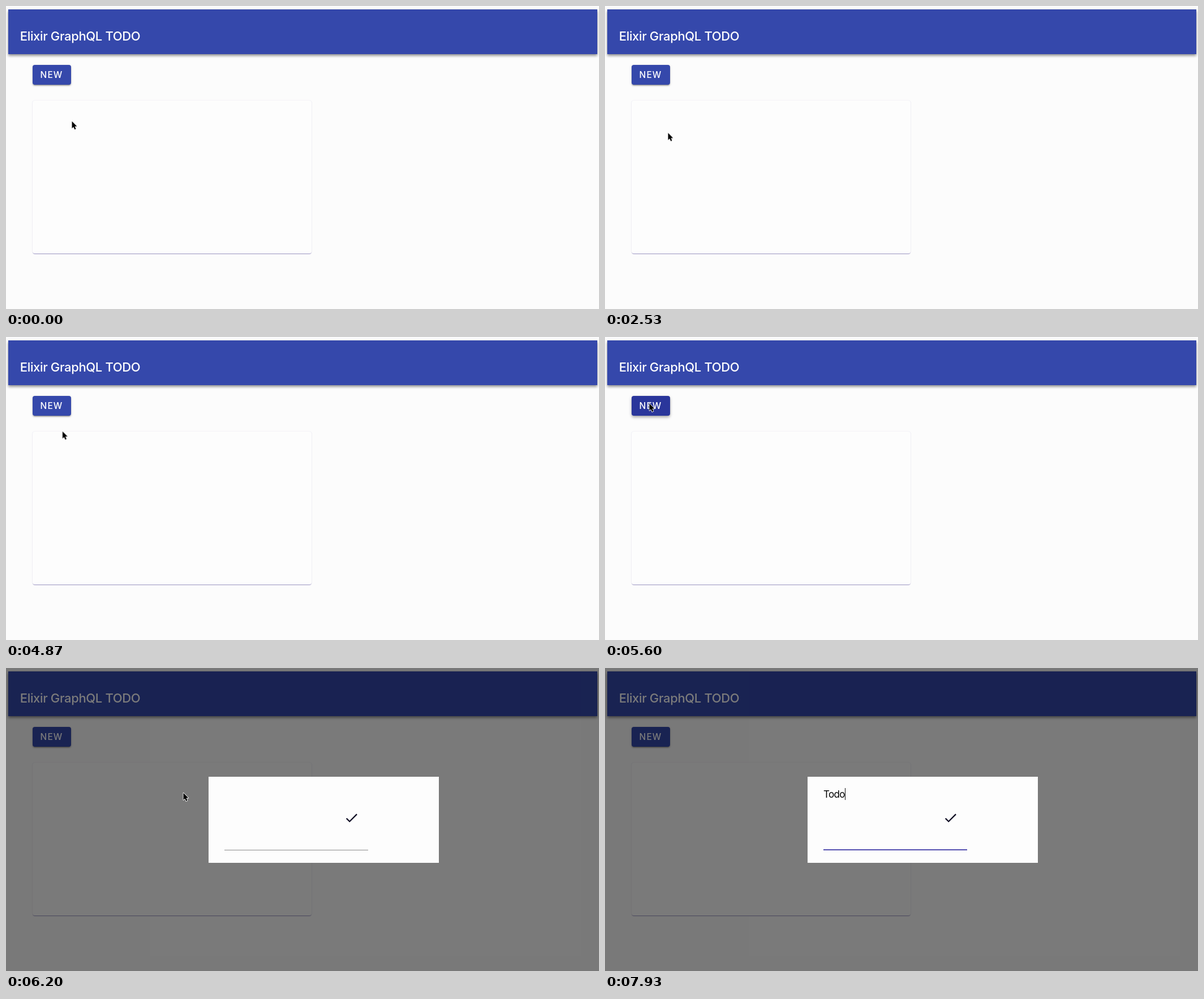
These frames come from a looping animation (1048x535 px, 8 s). An HTML page:

```html
<!DOCTYPE html>
<html lang="en">
<head>
<meta charset="utf-8">
<title>Todo app</title>
<style>
  html, body { margin: 0; width: 100%; height: 100%; overflow: hidden; background: #fcfcfc; }
  body { position: relative; font-family: Inter, Roboto, sans-serif; }
  div, svg { position: absolute; box-sizing: border-box; white-space: nowrap; }
  svg { overflow: visible; }

  /* Every animation shares one 8 s loop, so 1% is 80 ms. */
  .loop { animation: 8s linear infinite; }
  .switch { animation: 8s step-end infinite; }

  .bar {
    left: 4px; top: 6px; width: 1041px; height: 79px;
    background: #3548ab;
    box-shadow: 0 2px 4px -1px #0004, 0 4px 4px #0003, 0 1px 6px #0002;
  }
  .title {
    left: 24.8px; top: 40px;
    font-size: 22px; font-weight: 500; line-height: 26px; letter-spacing: -.35px;
    color: #fff;
  }
  .button {
    left: 47px; top: 104px; width: 68px; height: 35px; padding-left: 13.6px;
    border-radius: 4px; color: #fff;
    font-size: 15.5px; font-weight: 500; line-height: 35px; letter-spacing: 1.1px;
    animation-name: hover;
  }
  .clip { inset: 0; overflow: hidden; border-radius: 4px; }
  .ripple {
    left: -8px; top: -25px; width: 78px; height: 78px;
    border-radius: 50%; background: #fff;
    animation-name: ripple;
  }
  .card {
    left: 47px; top: 167px; width: 493px; height: 270px;
    border-radius: 4px; background: #fdfdfd;
    box-shadow: 0 2px 1px -1px #3a2e8a55, 0 1px 1px #3a2e8a33, 0 0 2px #3a2e8a22;
  }

  .modal { inset: 0; background: #00000084; animation-name: open; }
  .panel { left: 357.5px; top: 192px; width: 407px; height: 152px; background: #fdfdfd; }
  .line { left: 386px; top: 321px; width: 254px; height: 1px; background: #8c8c8c; }
  .focus { left: 386px; top: 320px; width: 254px; height: 2px; background: #5550b0; animation-name: focus; }
  .check { left: 597.1px; top: 250.6px; width: 27.3px; height: 27.3px; fill: #0c0a22; }
  .field {
    left: 386px; top: 212px; height: 21px; overflow: hidden;
    box-sizing: content-box; border-right: 1px solid #111;
    font-size: 17px; line-height: 22px; letter-spacing: -.7px; color: #000;
    animation-name: type;
  }

  .pointer { left: 0; top: 0; animation-name: move; }
  .arrow { animation-name: arrow; }
  .beam { animation-name: beam; }

  @keyframes hover {
    0%, 64.5% {
      background: #3548ab;
      box-shadow: 0 3px 1px -2px #0003, 0 2px 2px #0003, 0 1px 5px #0002;
    }
    67%, 74% {
      background: #2a369b;
      box-shadow: 0 2px 4px -1px #0003, 0 4px 5px #0002, 0 1px 6px #0002;
    }
    77%, 100% {
      background: #3548ab;
      box-shadow: 0 3px 1px -2px #0003, 0 2px 2px #0003, 0 1px 5px #0002;
    }
  }
  @keyframes ripple {
    0%, 70.2% { transform: scale(.35); opacity: 0; }
    70.85% { transform: scale(.5); opacity: .16; }
    74% { transform: scale(1); opacity: .2; }
    77%, 100% { transform: scale(1); opacity: 0; }
  }
  @keyframes open {
    0% { visibility: hidden; }
    70.85%, 100% { visibility: visible; }
  }
  @keyframes focus {
    0%, 83.1% { transform: scaleX(0); }
    85.6%, 100% { transform: scaleX(1); }
  }
  @keyframes type {
    0% { width: 0; opacity: 0; }
    83.1% { width: 0; opacity: 1; }
    90% { width: 9.5px; opacity: 1; }
    93% { width: 19px; opacity: 1; }
    95.7% { width: 28.5px; opacity: 1; }
    98.35%, 100% { width: 38.3px; opacity: 1; }
  }
  @keyframes move {
    0% { transform: translate(116px, 203px); }
    6% { transform: translate(118px, 206px); }
    11% { transform: translate(126px, 203px); }
    15% { transform: translate(129px, 197px); }
    21.5% { transform: translate(130px, 207px); }
    27% { transform: translate(121px, 229px); }
    33% { transform: translate(108px, 222px); }
    39% { transform: translate(102px, 193px); }
    44% { transform: translate(109px, 173px); }
    47.5% { transform: translate(116px, 168px); }
    51% { transform: translate(129px, 185px); }
    54% { transform: translate(127px, 215px); }
    57% { transform: translate(114px, 208px); }
    61% { transform: translate(99px, 165px); }
    65% { transform: translate(82px, 124px); }
    67%, 73.5% { transform: translate(78px, 117px); }
    75.5% { transform: translate(160px, 158px); }
    78% { transform: translate(350px, 235px); }
    80.5% { transform: translate(436px, 258px); }
    82%, 100% { transform: translate(449px, 261px); }
  }
  @keyframes arrow {
    0% { visibility: visible; }
    78.8%, 100% { visibility: hidden; }
  }
  @keyframes beam {
    0% { visibility: hidden; }
    78.8% { visibility: visible; }
    90%, 100% { visibility: hidden; }
  }
</style>
</head>
<body>
  <div class="bar"></div>
  <div class="title">Elixir GraphQL TODO</div>
  <div class="button loop">NEW<div class="clip"><div class="ripple loop"></div></div></div>
  <div class="card"></div>

  <div class="modal switch">
    <div class="panel"></div>
    <div class="line"></div>
    <div class="focus loop"></div>
    <div class="field switch">Todo</div>
    <svg class="check" viewBox="0 0 24 24"><path d="M9 16.17 4.83 12l-1.42 1.41L9 19 21 7l-1.41-1.41z"/></svg>
  </div>

  <svg class="pointer loop" width="1" height="1">
    <path class="arrow switch" d="M.5 .5V13l2.8-2.6 2 4.7 2.2-1-2-4.5h3.9z"
          fill="#000" stroke="#fff" stroke-width="1.6" stroke-linejoin="round" paint-order="stroke"/>
    <path class="beam switch" d="M-3-6.5Q0-6.5 0-4.5Q0-6.5 3-6.5M0-5V5M-3 6.5Q0 6.5 0 4.5Q0 6.5 3 6.5M-1.5 2.5h3"
          fill="none" stroke="#111" stroke-width="1.2"/>
  </svg>
</body>
</html>
```
